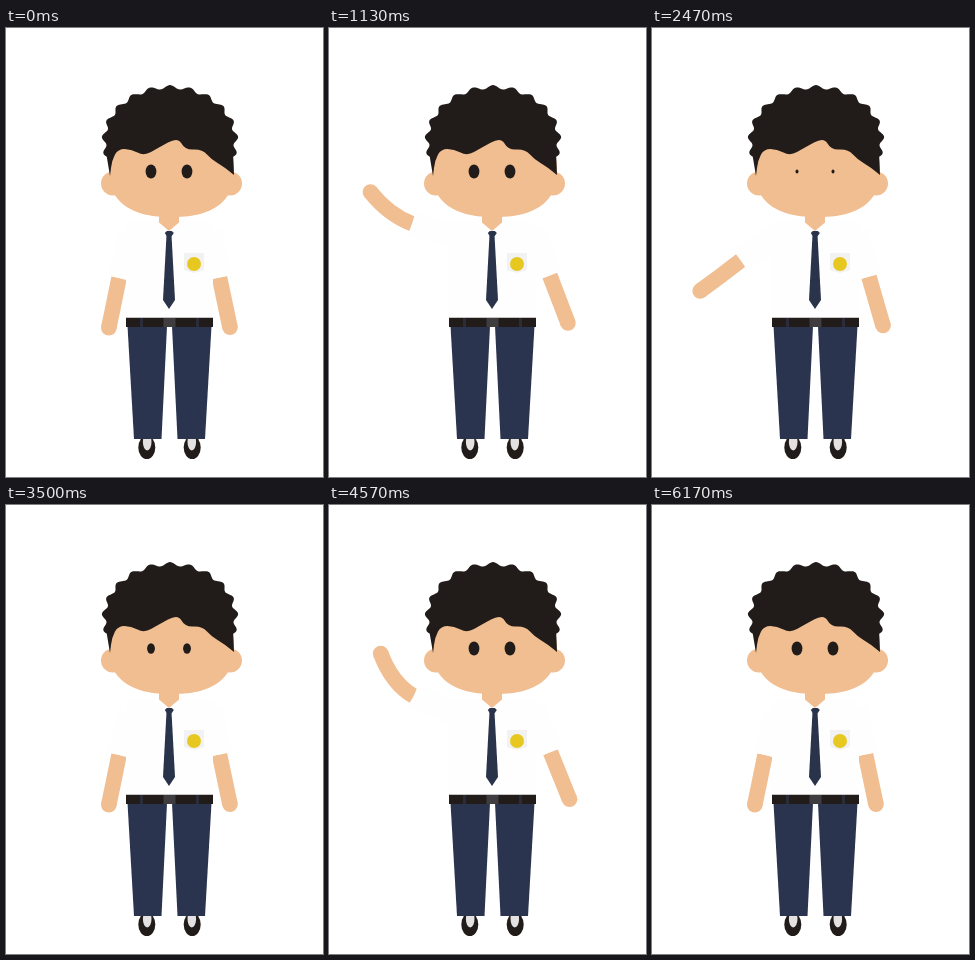
Animation, 317 px wide and 449 px high, one loop 6.61 s. Source, as an HTML page with a canvas:

```html
<!DOCTYPE html>
<html lang="en">
<head>
<meta charset="utf-8">
<title>Waving student</title>
<style>
html, body { margin: 0; width: 100%; height: 100%; overflow: hidden; background: #fff; }
canvas { display: block; width: 317px; height: 449px; }
</style>
</head>
<body>
<canvas id="stage" width="317" height="449"></canvas>
<script>
const ctx = document.getElementById('stage').getContext('2d');

const SKIN = '#f1be91', DARK = '#211c1a', NAVY = '#2a344e', TIE = '#29334a', SHIRT = '#fefefe';
const LOOP = 6610, CYCLE = 3300, STEP = 100 / 3;
const MIDDLE = 163.5, FACE = 165.5;

const clamp = x => Math.max(0, Math.min(1, x));
const cubic = x => x < 0.5 ? 4 * x ** 3 : 1 - 4 * (1 - x) ** 3;
const ease = (t, from, to) => cubic(clamp((t - from) / (to - from)));
const rad = deg => deg * Math.PI / 180;

// Turn a point about a pivot, clockwise on screen.
function turn([x, y], [px, py], deg) {
  const c = Math.cos(rad(deg)), s = Math.sin(rad(deg));
  return [px + (x - px) * c - (y - py) * s, py + (x - px) * s + (y - py) * c];
}

function poly(color, pts) {
  ctx.fillStyle = color;
  ctx.beginPath();
  pts.forEach(p => ctx.lineTo(...p));
  ctx.fill();
}

// A shape with equal halves, given as [half width, y] from top to bottom.
function mirrored(color, axis, ...half) {
  const right = half.map(([w, y]) => [axis + w, y]);
  const left = half.map(([w, y]) => [axis - w, y]).reverse();
  poly(color, right.concat(left));
}

function oval(color, x, y, rx, ry = rx) {
  ctx.fillStyle = color;
  ctx.beginPath();
  ctx.ellipse(x, y, rx, ry, 0, 0, 7);
  ctx.fill();
}

// Sleeve from the shoulder to the cuff, then a bare forearm with a round hand.
function arm(shoulder, cuff, bend, hand) {
  ctx.lineWidth = 15.6;
  ctx.strokeStyle = SKIN;
  ctx.beginPath();
  ctx.moveTo(...cuff);
  ctx.quadraticCurveTo(...bend, ...hand);
  ctx.stroke();
  oval(SKIN, ...hand, 7.8);
  ctx.lineWidth = 24;
  ctx.strokeStyle = SHIRT;
  ctx.beginPath();
  ctx.moveTo(...shoulder);
  ctx.lineTo(...cuff);
  ctx.stroke();
}

// The forearm curls more the higher the hand goes.
function leftArm(lift) {
  const pivot = [125, 208];
  const curl = 19 * (lift / 116) ** 3;
  const upper = lift - curl;
  arm(pivot,
    turn([113, 250], pivot, upper),
    turn([108, 275], pivot, upper + curl / 4),
    turn([102.8, 299.8], pivot, lift));
}

function rightArm(lift) {
  const pivot = [204, 203];
  const at = p => turn(p, pivot, -lift);
  arm(pivot, at([213.5, 249.5]), at([218.7, 274.5]), at([224, 299.3]));
}

// Superellipse, a little squarer than an oval.
function face() {
  const bow = v => Math.sign(v) * Math.abs(v) ** (2 / 2.4);
  const pts = [];
  for (let a = 0; a < 360; a += 3) {
    pts.push([FACE + 62.5 * bow(Math.cos(rad(a))), 143 + 46 * bow(Math.sin(rad(a)))]);
  }
  poly(SKIN, pts);
}

// Wavy ellipse on top, smooth fringe below.
function hair() {
  const fringe = [[228, 147], [217, 138], [206, 132], [196, 121], [179, 122], [172, 109],
    [152, 120], [138, 128], [125, 121], [112, 121], [106, 132], [104, 148]];
  ctx.fillStyle = DARK;
  ctx.beginPath();
  for (let a = -107; a <= 107; a++) {
    const r = 1 + 0.035 * Math.cos(rad(21 * a));
    ctx.lineTo(164 + 66 * r * Math.sin(rad(a)), 113 - 54 * r * Math.cos(rad(a)));
  }
  ctx.lineTo(...fringe[0]);
  fringe.slice(1, -1).forEach(([x, y], i) => {
    const [nx, ny] = fringe[i + 2];
    ctx.quadraticCurveTo(x, y, (x + nx) / 2, (y + ny) / 2);
  });
  ctx.lineTo(...fringe.at(-1));
  ctx.fill();
}

function head(eye) {
  for (const side of [-1, 1]) oval(SKIN, FACE + side * 58.5, 155.5, 12);
  face();
  hair();
  for (const side of [-1, 1]) oval(DARK, 163 + side * 18, 143.5, 5.4 * eye, 7.1 * eye);
}

function legs() {
  for (const side of [-1, 1]) {
    const x = w => MIDDLE + side * w;
    oval(DARK, x(22.7), 419.5, 8.5, 11.5);
    oval('#e3e1e1', x(22.3), 414, 4.3, 8.5);
    poly(NAVY, [[x(2.5), 298], [x(42), 298], [x(35.5), 411], [x(8), 411]]);
  }
  mirrored(DARK, MIDDLE, [43.5, 289.5], [43.5, 299]);
  mirrored('#3f3d40', MIDDLE, [6, 290], [6, 299]);
  for (const side of [-1, 1]) mirrored('#2a2d39', MIDDLE + side * 28, [1.5, 290], [1.5, 299]);
}

function torso() {
  mirrored(SHIRT, MIDDLE, [10, 192], [43.5, 195], [43.5, 289.5]);
  mirrored(SKIN, 163, [10, 184], [10, 194.5], [0, 203]);
  mirrored(TIE, 163, [2.5, 207], [6, 272], [0, 281]);
  mirrored(TIE, 163.3, [2.5, 203], [4.5, 205], [2.5, 208]);
  mirrored('#f2f2f2', 188, [10, 225], [10, 242], [0, 245]);
  oval('#e6c820', 188, 236, 7);
}

// Four evenly spaced blinks per cycle.
function eyeSize(t) {
  const x = t < 4 * 733.3 ? (t % 733.3 - 167) / 166 : 0;
  return x > 0 && x < 1 ? 1 - 0.4 * (1 - Math.cos(2 * Math.PI * x)) : 1;
}

function draw(t) {
  const raised = ease(t, 445, 1440) - ease(t, 1933, 2890);
  const dip = ease(t, 1440, 1686) - ease(t, 1686, 1933);
  const swing = ease(t, 445, 1440) - ease(t, 1985, 2890);
  ctx.fillStyle = '#fff';
  ctx.fillRect(0, 0, 317, 449);
  legs();
  leftArm(118 * raised - 23.8 * dip);
  rightArm(10.3 * swing);
  torso();
  head(eyeSize(t));
}

const start = performance.now();
function tick() {
  const t = (performance.now() - start) % LOOP;
  const local = t < 2 * CYCLE ? t % CYCLE : 0;
  draw(Math.floor((local + 3.4) / STEP) * STEP);
  requestAnimationFrame(tick);
}
tick();
</script>
</body>
</html>
```
